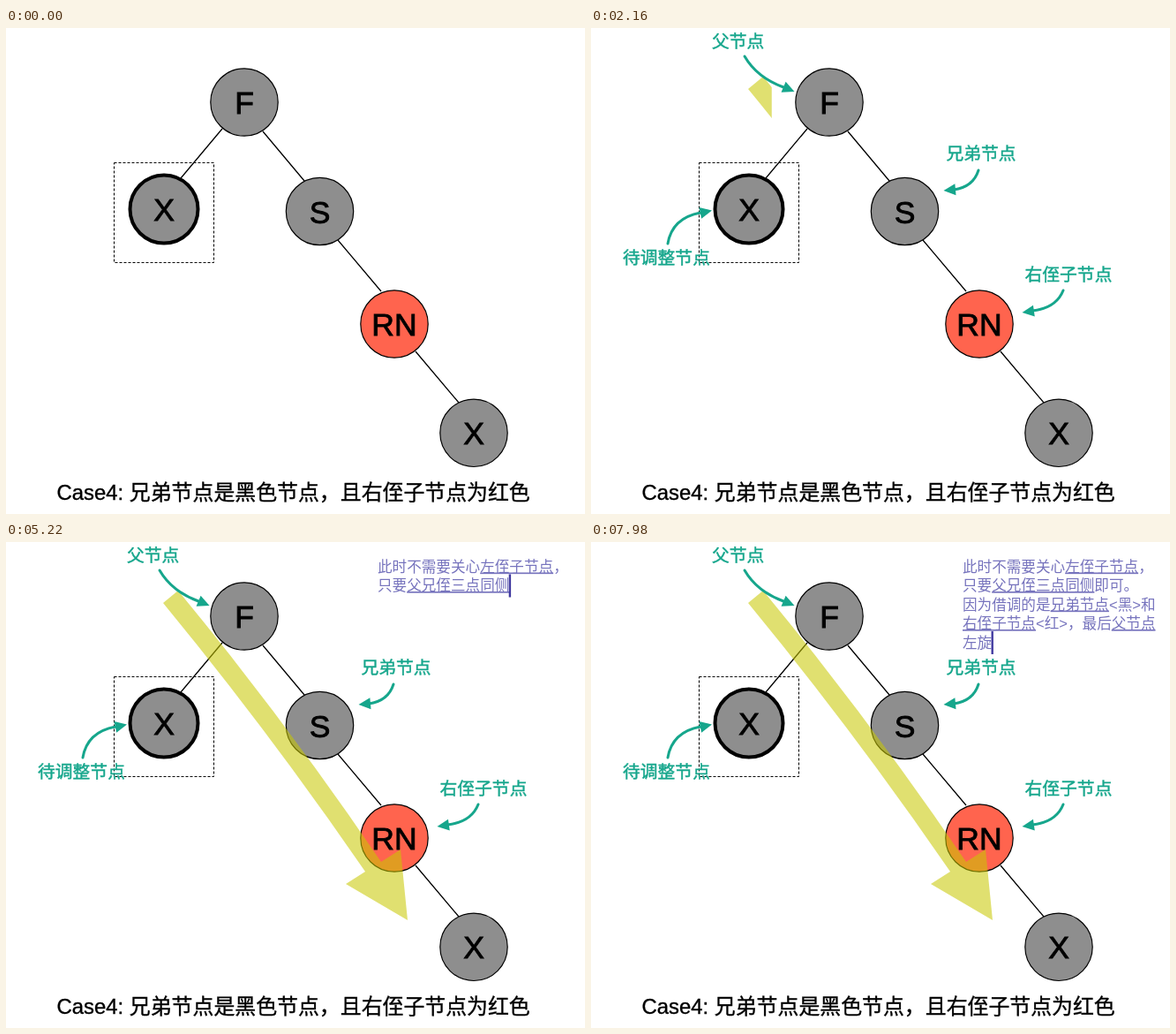
An HTML page for the animation above (8 s loop, 656 by 550 pixels).

```html
<!DOCTYPE html>
<html lang="zh-CN">
<head>
<meta charset="utf-8">
<title>Case4</title>
<style>
  html, body { margin: 0; width: 100%; height: 100%; overflow: hidden; background: #fff; }
  svg { display: block; width: 656px; height: 550px; }
  text { font-family: "Liberation Sans", "Noto Sans CJK SC", "Noto Sans CJK", sans-serif; white-space: pre; }
  .node { stroke: #000; stroke-width: 1.2; }
  .name { font-size: 35.5px; text-anchor: middle; stroke: #000; stroke-width: .9; }
  .caption { font-size: 23.9px; stroke: #000; stroke-width: .35; }
  .label { fill: #16a68c; }
  .label text { font-size: 19.8px; stroke: #16a68c; stroke-width: .45; }
  .label path { fill: none; stroke: #16a68c; stroke-width: 3; stroke-linecap: round; }
  .note { font-size: 16.6px; fill: #7673bd; }
  .u { text-decoration: underline; text-decoration-thickness: 1px; }
</style>
</head>
<body>
<svg id="stage" viewBox="0 0 656 550">
  <defs><clipPath id="wipe"><rect id="wipeBox" x="170" y="40" width="0" height="400"/></clipPath></defs>
  <path d="M245 114L198 170M291 117L338 173M376 240L425 298M464 366L513 424" stroke="#000" stroke-width="1.3"/>
  <rect x="122.5" y="152.5" width="113" height="113" fill="none" stroke="#000" stroke-dasharray="3 2"/>
  <g id="nodes"></g>
  <text class="caption" x="57.5" y="534">Case4: 兄弟节点是黑色节点，且右侄子节点为红色</text>
  <path id="sweep" clip-path="url(#wipe)" fill="#c8c800" fill-opacity=".56"
    d="M178 69L195 55Q317 203 425 362L447 348L455 428L385 387L407 373Q299 216 178 69Z"/>
  <g id="labels"></g>
  <g id="notes"></g>
  <rect id="caret" width="2.4" height="26" fill="#413aa0"/>
</svg>
<script>
const LOOP = 8000, POP = 550, SIZE = 16.6, LEFT = 421;
const $ = id => document.getElementById(id);

function add(parent, tag, attrs, text = '') {
  const el = document.createElementNS('http://www.w3.org/2000/svg', tag);
  for (const k in attrs) el.setAttribute(k, attrs[k]);
  el.textContent = text;
  parent.appendChild(el);
  return el;
}

const GRAY = '#8e8e8e', RED = '#ff644e';
[
  ['F', 270, 84, GRAY],
  ['X', 179, 205, GRAY, true],
  ['S', 355.5, 207.5, GRAY],
  ['RN', 440, 335, RED],
  ['X', 530, 458.3, GRAY]
].forEach(([name, cx, cy, fill, thick]) => {
  const c = add($('nodes'), 'circle', { class: 'node', cx, cy, r: thick ? 38.5 : 38.2, fill });
  if (thick) c.style.strokeWidth = 4;
  add($('nodes'), 'text', { class: 'name', x: cx, y: cy + 13 }, name);
});

// Labels: text, text position, curve, arrow tip with angle, centre, start time
const labels = [
  { text: '待调整节点', x: 36, y: 267, d: 'M87 244Q92 215 124 209', tip: [137, 206.5, -12], c: [86, 238], at: 30 },
  { text: '父节点', x: 137, y: 21.5, d: 'M174 32Q188 56 218 67', tip: [230.5, 72, 23], c: [184, 40], at: 515 },
  { text: '兄弟节点', x: 402.5, y: 149, d: 'M439 161Q433 180 411 183', tip: [399.5, 184, 175], c: [441, 162], at: 1000 },
  { text: '右侄子节点', x: 491.5, y: 286, d: 'M535 297Q527 317 500 320', tip: [488.5, 322, 172], c: [540, 298], at: 1490 }
];
for (const l of labels) {
  const [x, y, a] = l.tip;
  l.el = add($('labels'), 'g', { class: 'label' });
  add(l.el, 'text', { x: l.x, y: l.y }, l.text);
  add(l.el, 'path', { d: l.d });
  add(l.el, 'polygon', { points: '0,0 -13.5,-6.5 -13.5,6.5', transform: `translate(${x} ${y}) rotate(${a})` });
}

// Odd pieces between bars are underlined
const lines = [
  '此时不需要关心|左侄子节点|，',
  '只要|父兄侄三点同侧|即可。',
  '因为借调的是|兄弟节点|<黑>和',
  '|右侄子节点|<红>，最后|父节点',
  '左旋'
].map((line, i) => {
  const y = 33.5 + i * 21.5;
  const el = add($('notes'), 'text', { class: 'note', x: LEFT, y });
  const parts = line.split('|').map((s, k) => ({ s, el: add(el, 'tspan', k % 2 ? { class: 'u' } : {}) }));
  return { y, parts, all: parts.map(p => p.s).join('') };
});

const keys = [[3300, 0], [4080, 9.3], [5220, 22.3], [6840, 43.3], [7980, 55]];
function typed(t) {
  if (t <= keys[0][0]) return 0;
  let i = 1;
  while (i < keys.length - 1 && t > keys[i][0]) i++;
  const [t0, n0] = keys[i - 1], [t1, n1] = keys[i];
  return Math.min(55, Math.floor(n0 + (n1 - n0) * (t - t0) / (t1 - t0)));
}

const clamp = v => Math.max(0, Math.min(1, v));
const outBack = p => 1 + 2.70158 * (p - 1) ** 3 + 1.70158 * (p - 1) ** 2;
const width = s => [...s].reduce((w, ch) => w + ('<>'.includes(ch) ? .584 : 1) * SIZE, 0);

function drawNotes(count) {
  let left = count;
  $('caret').setAttribute('visibility', count ? 'visible' : 'hidden');
  for (const line of lines) {
    const shown = line.all.slice(0, left);
    if (shown) {
      $('caret').setAttribute('x', LEFT + width(shown) - .7);
      $('caret').setAttribute('y', line.y - 18.5);
    }
    for (const p of line.parts) {
      p.el.textContent = p.s.slice(0, left);
      left = Math.max(0, left - p.s.length);
    }
  }
}

let last = -1;
function draw(t) {
  for (const { el, c: [x, y], at } of labels) {
    const p = clamp((t - at) / POP), s = outBack(p);
    el.setAttribute('transform', `translate(${x} ${y}) scale(${s}) translate(${-x} ${-y})`);
    el.setAttribute('opacity', clamp(p / .33));
  }
  const w = clamp((t - 2040) / 560);
  $('wipeBox').setAttribute('width', 290 * w * w * (3 - 2 * w));
  const n = typed(t);
  if (n !== last) drawNotes(last = n);
}

const start = performance.now();
function tick() {
  draw((performance.now() - start) % LOOP);
  requestAnimationFrame(tick);
}
tick();
</script>
</body>
</html>
```
